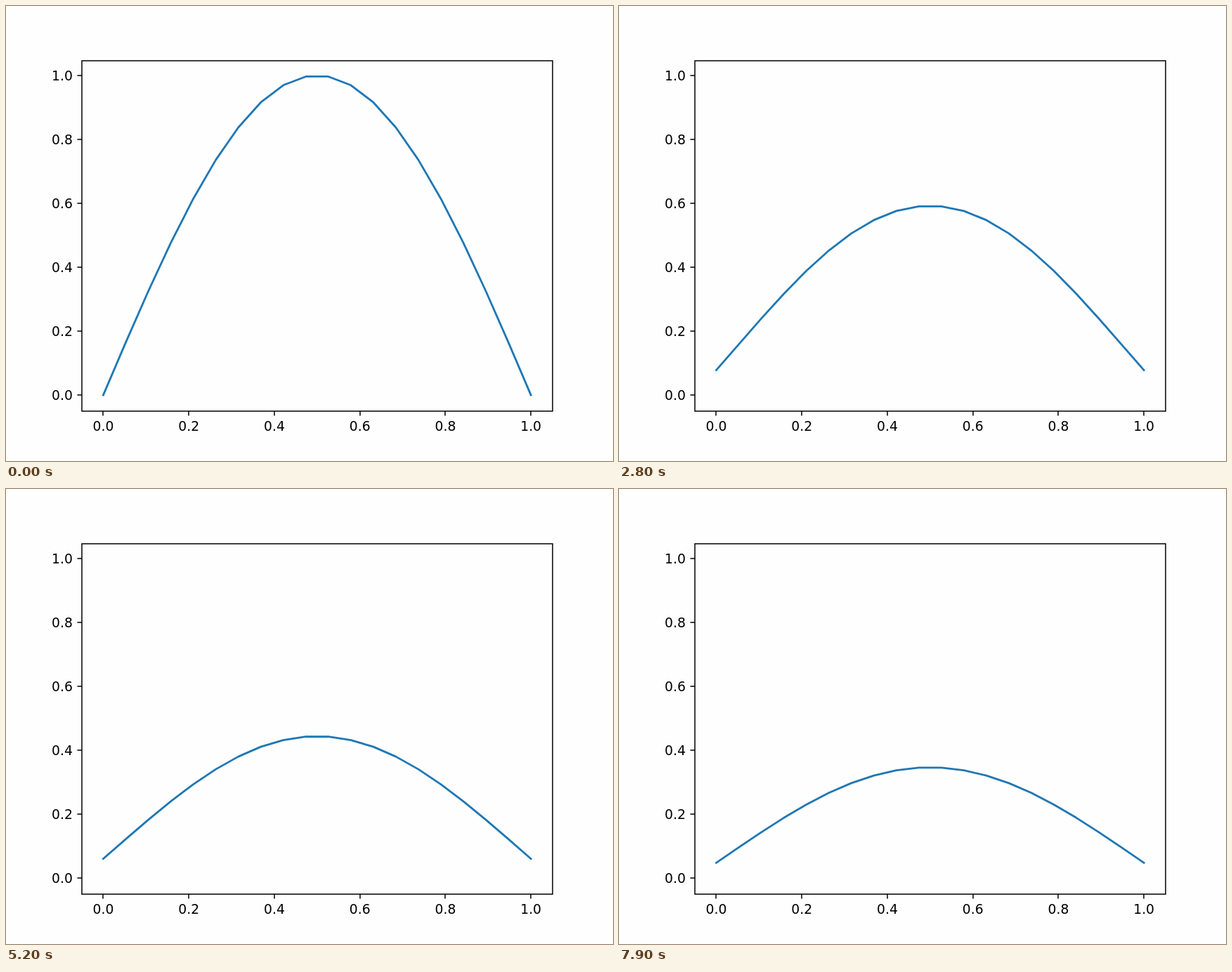
An HTML page for the animation above (8000 ms loop, 864x648 px).

```html
<!DOCTYPE html>
<html lang="en">
<head>
<meta charset="utf-8">
<title>Diffusing sine profile</title>
<style>
  html, body { margin: 0; width: 100%; height: 100%; overflow: hidden; background: #fefefe; }
  svg { display: block; }
  .axes { fill: none; stroke: #000; stroke-width: 1.5; }
  .curve { fill: none; stroke: #1f77b4; stroke-width: 2.8125; stroke-linecap: square; stroke-linejoin: round; }
  text { font: 18.75px "DejaVu Sans", sans-serif; fill: #000; }
</style>
</head>
<body>
<svg width="864" height="648" viewBox="0 0 864 648">
  <path class="axes" id="axes"/>
  <g id="labels"></g>
  <path class="curve" id="curve"/>
</svg>
<script>
const STEP = 100, STEPS = 80;
const N = 20, MID = (N - 1) / 2, ANGLE = Math.PI / (N - 1);
const PEAK = Math.sin(9 * ANGLE);
const px = x => 138.436 + 608.727 * x;
const py = y => 554.04 - 453.6 * y / PEAK;

const labels = document.getElementById("labels");
const curve = document.getElementById("curve");

function addLabel(text, x, y, anchor) {
  const el = document.createElementNS("http://www.w3.org/2000/svg", "text");
  el.setAttribute("x", x);
  el.setAttribute("y", y);
  el.setAttribute("text-anchor", anchor);
  el.textContent = text;
  labels.append(el);
}

function drawAxes() {
  let d = "M108 78H778V577H108Z";
  for (let i = 0; i <= 5; i++) {
    const v = i / 5, x = Math.round(px(v)), y = Math.round(py(v));
    d += `M${x} 577v6.56M108 ${y}h-6.56`;
    addLabel(v.toFixed(1), px(v), 605, "middle");
    addLabel(v.toFixed(1), 94.9, y + 7, "end");
  }
  document.getElementById("axes").setAttribute("d", d);
}

// Solves u - t u'' = sin(pi x) on the grid, with u = 0 one node past each end.
function profile(t) {
  const scale = 1 / (1 + 2 * t * (1 - Math.cos(ANGLE)));
  const k = t ? Math.acosh(1 + 0.5 / t) : 0;
  const lift = t ? Math.sin(ANGLE) * scale / Math.cosh(k * (MID + 1)) : 0;
  return Array.from({ length: N }, (_, i) =>
    Math.sin(ANGLE * i) * scale + lift * Math.cosh(k * (i - MID)));
}

let shown = -1;
function draw(now) {
  const t = Math.floor(now / STEP) % STEPS;
  if (t !== shown) {
    shown = t;
    const points = profile(t).map((u, i) => `${px(i / (N - 1)).toFixed(2)} ${py(u).toFixed(2)}`);
    curve.setAttribute("d", "M" + points.join("L"));
  }
}

drawAxes();
draw(0);
let start;
requestAnimationFrame(function tick(now) {
  start ??= now;
  draw(now - start);
  requestAnimationFrame(tick);
});
</script>
</body>
</html>
```
